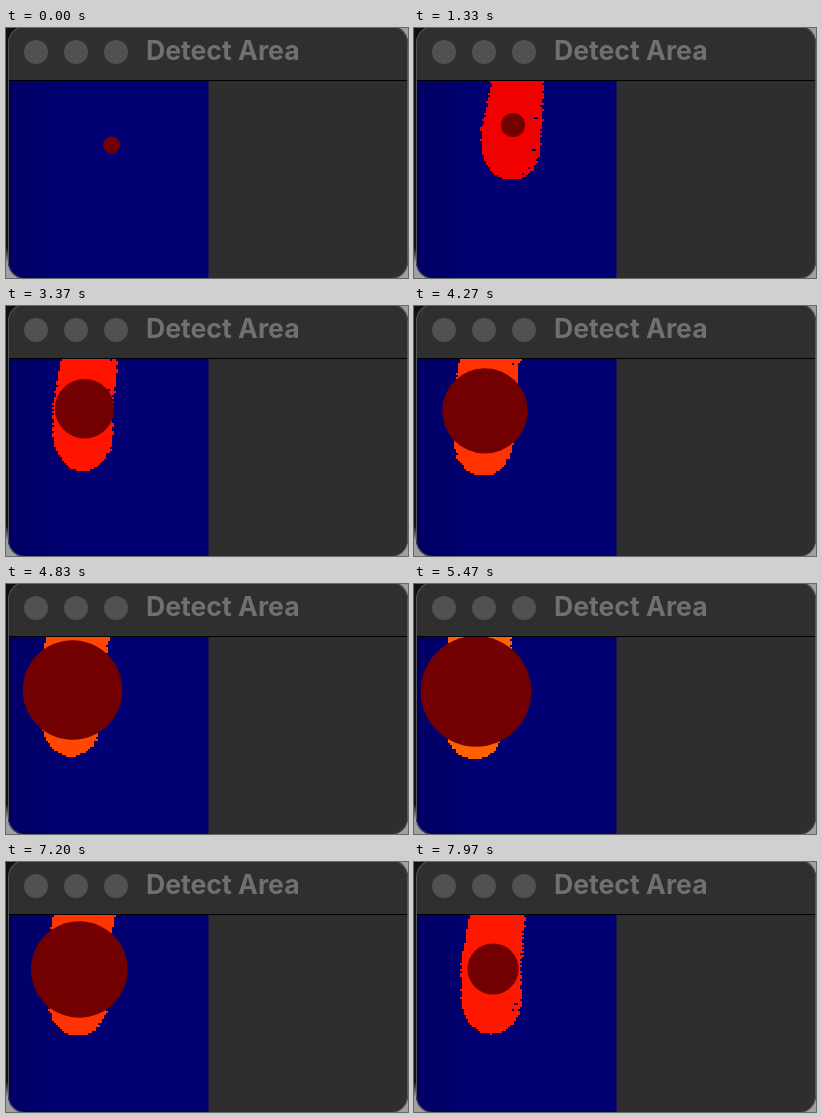
An HTML page with a canvas for the animation above (8000 ms loop, 402x250 px).

```html
<!DOCTYPE html>
<html lang="en">
<head>
<meta charset="utf-8">
<title>Detect Area</title>
<style>
  html, body { margin: 0; width: 100%; height: 100%; overflow: hidden; }
  body { background: linear-gradient(#111 88%, #a0a0a0 94%) 0 0 / 14px 100% no-repeat #a0a0a0; }
  .window {
    position: absolute; left: 2px; top: -2px; width: 400px; height: 253px;
    border-radius: 17px; overflow: hidden; background: #2e2e2e;
  }
  .bar { position: absolute; inset: 0 0 auto; height: 54px; background: #2f2f2f; border-bottom: 1px solid #000; }
  .light { position: absolute; top: 14px; width: 24px; height: 24px; border-radius: 50%; background: #515151; }
  .bar svg { position: absolute; left: 0; top: 0; }
  text { font: 700 26.6px Inter, sans-serif; fill: #707070; }
  canvas { position: absolute; left: 0; top: 55px; }
  .rim { position: absolute; inset: 0; border-radius: 17px; box-shadow: inset 0 0 0 1px #555; }
</style>
</head>
<body>
<div class="window">
  <div class="bar">
    <i class="light" style="left:16px"></i>
    <i class="light" style="left:56px"></i>
    <i class="light" style="left:96px"></i>
    <svg width="400" height="52"><text x="138" y="34">Detect Area</text></svg>
  </div>
  <canvas width="201" height="197"></canvas>
  <div class="rim"></div>
</div>
<script>
const LOOP = 8000, STEP = 1000 / 30, CELL = 2, LEFT = 2, TOP = 53;
const ENTER = 970, SETTLE = 1330, TURN = 6400;
const ctx = document.querySelector('canvas').getContext('2d');
ctx.translate(-LEFT, -TOP);

const water = ctx.createLinearGradient(LEFT, 0, 70, 0);
water.addColorStop(0, '#000064');
water.addColorStop(1, '#000073');

const progress = (t, from, to) => Math.min(1, Math.max(0, (t - from) / (to - from)));
const easeOut = k => 1 - (1 - k) ** 2;
const smooth = k => k * k * (3 - 2 * k);
const snap = v => Math.round(v / CELL) * CELL;

function hash(a, b) {
  const n = Math.sin(a * 12.9898 + b * 78.233) * 43758.5453;
  return n - Math.floor(n);
}

// The finger enters, drifts left while pressing harder, then eases back.
function poseAt(t) {
  const away = 1 - easeOut(progress(t, ENTER, SETTLE));
  const k = progress(t, SETTLE, TURN);
  const drift = k + .3 * k * (1 - k);
  const back = easeOut(progress(t, TURN, LOOP));
  const press = smooth(progress(t, 1400, 6000));
  const release = smooth(progress(t, 6700, 8200));
  return {
    x: 99 - 43 * drift + 23 * back + 6.5 * away,
    y: 97 + 12 * drift - 2 * back + 20 * away,
    radius: 12 + 45 * press - 33.5 * release - 3.5 * away,
    tipY: 151 + 27 * drift - 7 * back - 98 * away,
    heat: 150 * drift ** 2 - 14 - 112 * back
  };
}

// Fills one row of cells between two x positions.
function span(x0, x1, y, color) {
  ctx.fillStyle = color;
  ctx.fillRect(snap(x0), y, Math.max(0, snap(x1) - snap(x0)), CELL);
}

function drawFinger({ x, tipY, radius, heat }, tick) {
  const color = `rgb(${255 + Math.min(0, heat)},${Math.max(0, heat)},0)`;
  const topHalf = 24 + radius * .15;
  for (let y = TOP; y < tipY; y += CELL) {
    const up = progress(y, tipY, tipY - 42);
    const high = progress(y, 100, TOP);
    const mid = x - 1.5 + 6 * high;
    const half = (30 + (topHalf - 30) * high) * Math.sqrt(1 - (1 - up) ** 2.4);
    const left = mid - half + (hash(y, tick) - .5) * 2;
    const right = mid + half + (hash(y + 7, tick) - .5) * 3;
    span(left, right, y, color);
    if (hash(y + 19, Math.floor(tick / 3)) > .96) span(right - 7, right - 4, y, '#000073');
  }
}

function drawDisc({ x, y, radius }) {
  ctx.fillStyle = '#730000';
  ctx.beginPath();
  ctx.arc(x, y, radius, 0, 2 * Math.PI);
  ctx.fill();
}

function draw(time) {
  const t = time % LOOP, pose = poseAt(t);
  ctx.clearRect(LEFT, TOP, 201, 197);
  ctx.fillStyle = water;
  ctx.fillRect(LEFT, TOP, 200.5, 197);
  if (t >= ENTER) drawFinger(pose, Math.floor(t / STEP));
  drawDisc(pose);
}

const start = performance.now();
function frame() {
  draw(performance.now() - start);
  requestAnimationFrame(frame);
}
frame();
</script>
</body>
</html>
```
